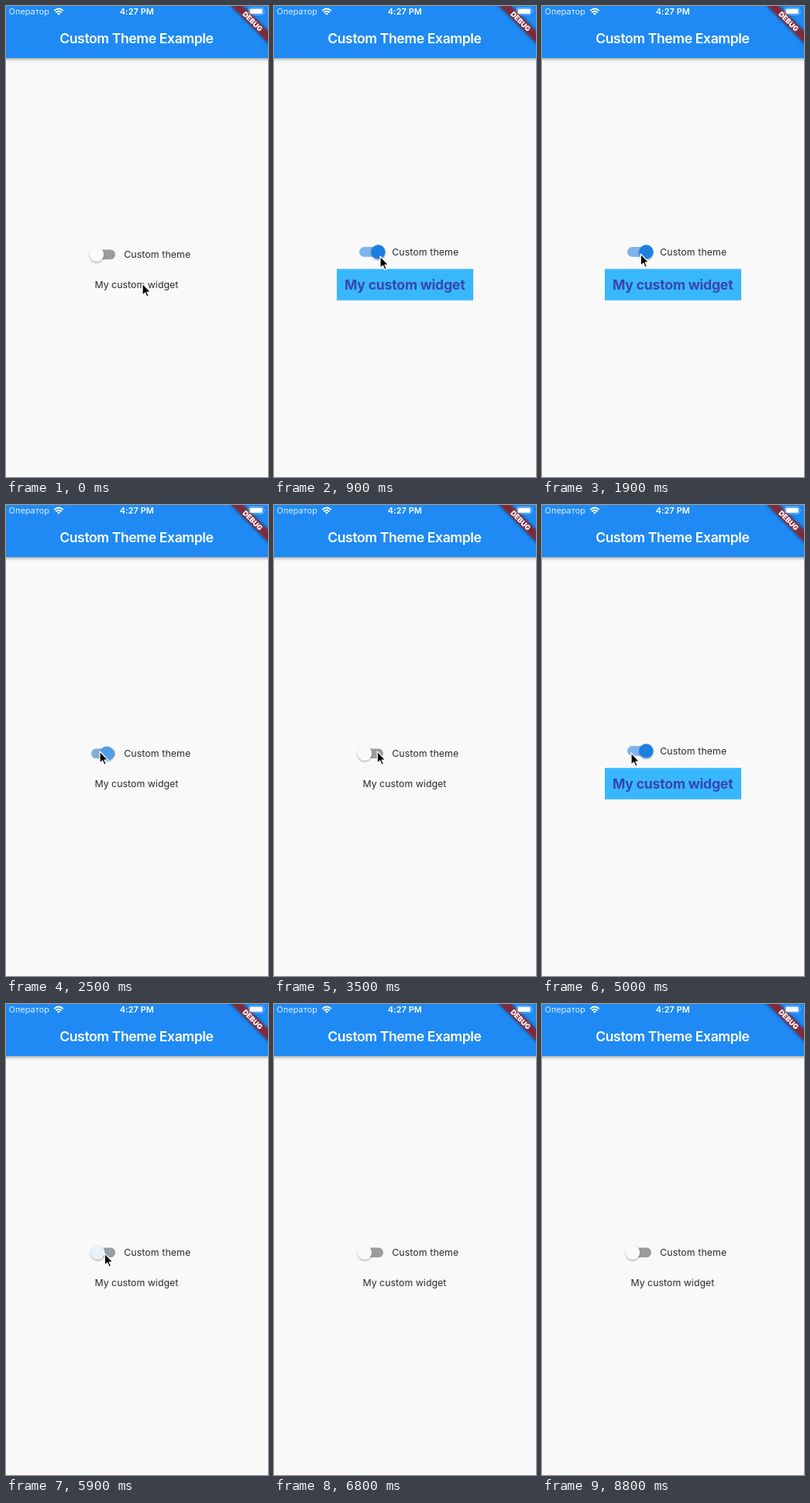
Write an HTML page that moves like this. It is 338 px wide and 606 px high and loops after 8900 ms.

```html
<!DOCTYPE html>
<html>
<head>
<meta charset="utf-8">
<style>
  html, body { margin: 0; width: 100%; height: 100%; overflow: hidden; background: #f9f9f9; }
  svg { display: block; width: 338px; height: 606px; font-family: Inter, Roboto, sans-serif; }
  .status { font-size: 10.8px; fill: #fff; letter-spacing: .1px; }
  .body { font-size: 12.3px; fill: #2a2a2a; }
  .mid { text-anchor: middle; }
</style>
</head>
<body>
<svg viewBox="0 0 338 606">
  <defs>
    <filter id="soft" x="-30%" y="-60%" width="160%" height="220%"><feGaussianBlur stdDeviation="2.2"/></filter>
    <filter id="lift" x="-50%" y="-50%" width="200%" height="200%">
      <feDropShadow dx="0" dy="1.2" stdDeviation="1.2" flood-color="#000" flood-opacity=".38"/>
    </filter>
  </defs>
  <rect width="338" height="606" fill="#f9f9f9"/>

  <!-- app bar -->
  <rect x="-10" y="10" width="358" height="58.2" fill="#000" opacity=".4" filter="url(#soft)"/>
  <rect width="338" height="67" fill="#1f8af3"/>
  <text class="mid" x="168.4" y="48.2" font-size="17.5" font-weight="600" letter-spacing="-.35" fill="#fff">Custom Theme Example</text>

  <!-- corner banner -->
  <g transform="translate(338 0) rotate(45)">
    <rect x="-44" y="22.7" width="88" height="10.8" fill="#000" opacity=".5" filter="url(#soft)"/>
    <rect x="-44" y="22.7" width="88" height="10.8" fill="#b71c1c" opacity=".627"/>
    <text class="mid" y="31.4" font-size="9.2" font-weight="900" fill="#fff">DEBUG</text>
  </g>

  <!-- status bar -->
  <text class="status" x="3.6" y="11.2" opacity=".85">Оператор</text>
  <g fill="none" stroke="#fff" stroke-width="1.8">
    <path d="M62.2 6.2Q68 .8 73.8 6.2M64.3 8.5Q68 5.1 71.7 8.5"/>
    <path d="M66 9.7Q68 8 70 9.7L68 11.8Z" fill="#fff" stroke="none"/>
  </g>
  <text class="status mid" x="168.8" y="11.2" font-weight="600">4:27 PM</text>
  <rect x="313" y="2.6" width="19" height="8.6" rx="2" fill="none" stroke="#fff" stroke-width=".7" opacity=".6"/>
  <rect x="314.5" y="3.8" width="16.2" height="6.2" rx="1" fill="#fff"/>
  <path d="M333.2 5.3q1.4 1.5 0 3z" fill="#fff" opacity=".6"/>

  <g id="row">
    <rect id="track" x="110" y="313.5" width="31" height="12.6" rx="6.3"/>
    <circle id="thumb" cy="319.8" r="9.2" filter="url(#lift)"/>
    <text class="body" x="152.2" y="324.3" letter-spacing=".12">Custom theme</text>
  </g>

  <text id="plain" class="body mid" x="168.4" y="362.7" letter-spacing=".05">My custom widget</text>
  <g id="themed">
    <rect x="81" y="338.3" width="176" height="40.4" fill="#39b7fd"/>
    <text class="mid" x="168.7" y="365" font-size="17.6" font-weight="700" letter-spacing="-.2" fill="#3845b3">My custom widget</text>
  </g>

  <path id="cursor" d="M0 0V15.2L3.5 11.9L5.8 17.2L8.2 16.2L5.9 11H10.6Z" fill="#000" stroke="#fff" stroke-width="1.2" stroke-linejoin="round"/>
</svg>
<script>
const LOOP = 8900, STEP = 100, SLIDE = 200, CURSOR_END = 6300;
const $ = id => document.getElementById(id);
const taps = [630, 2435, 4230, 5735];
// time, x, y of the pointer tip
const path = [
  [0, 176, 357], [600, 137, 322], [1500, 137, 322], [2200, 121, 317],
  [2700, 121, 317], [3800, 136, 317], [4400, 136, 317], [5000, 115, 319],
  [5800, 117, 320], [6200, 183, 327]
];

const lerp = (a, b, p) => a + (b - a) * p;
const clamp = p => Math.min(1, Math.max(0, p));
const ease = p => p * p * (3 - 2 * p);
const mix = (a, b, p) => `rgb(${a.map((v, i) => Math.round(lerp(v, b[i], p)))})`;
const show = (id, on) => $(id).setAttribute('visibility', on ? 'visible' : 'hidden');

function pointer(t) {
  const i = path.findIndex(k => k[0] > t);
  if (i < 0) return path[path.length - 1].slice(1);
  const a = path[i - 1], b = path[i];
  const p = ease((t - a[0]) / (b[0] - a[0]));
  return [lerp(a[1], b[1], p), lerp(a[2], b[2], p)];
}

function draw(t) {
  const past = taps.filter(tap => tap <= t);
  const on = past.length % 2 === 1;
  const slide = past.length ? ease(clamp((t - past[past.length - 1]) / SLIDE)) : 1;
  const p = on ? slide : 1 - slide;

  $('row').setAttribute('transform', `translate(0 ${on ? -3.4 : 0})`);
  $('track').setAttribute('fill', mix([156, 156, 156], [126, 180, 235], p));
  $('thumb').setAttribute('fill', mix([250, 250, 250], [27, 126, 224], p));
  $('thumb').setAttribute('cx', lerp(117, 134.4, p));
  show('plain', !on);
  show('themed', on);

  show('cursor', t < CURSOR_END);
  $('cursor').setAttribute('transform', `translate(${pointer(t)})`);
}

const start = performance.now();
function tick() {
  const t = (performance.now() - start) % LOOP;
  draw(Math.floor(t / STEP) * STEP);
  requestAnimationFrame(tick);
}
tick();
</script>
</body>
</html>
```
